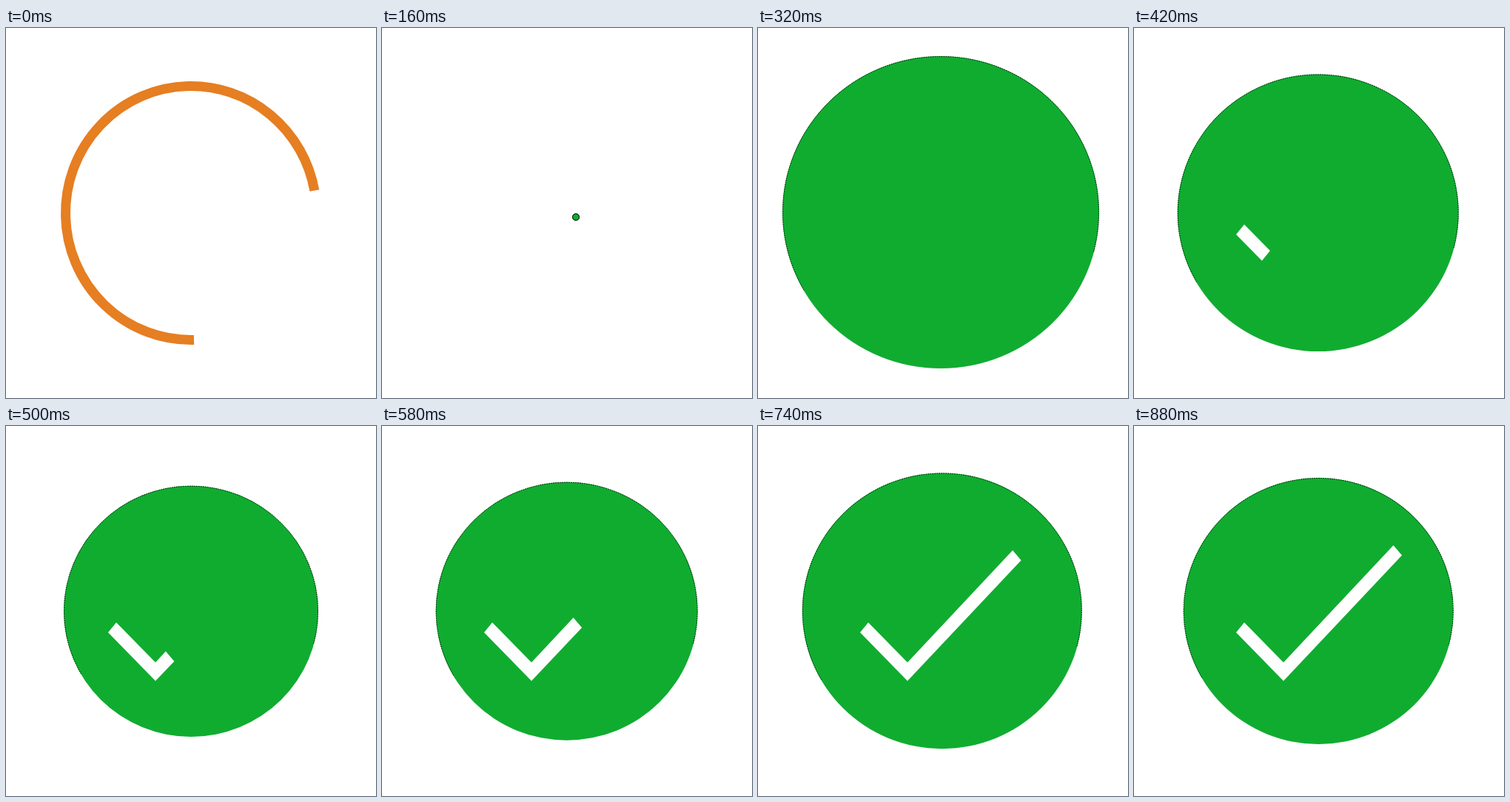
An HTML page with a canvas that plays this animation: 500 px wide and 500 px high, repeating every 1.04 s.

```html
<!DOCTYPE html>
<html lang="en">
<head>
<meta charset="utf-8">
<title>Loader to check mark</title>
<style>
html, body { margin: 0; width: 100%; height: 100%; overflow: hidden; background: #fff; }
canvas { display: block; width: 100vw; height: 100vh; }
</style>
</head>
<body>
<canvas id="stage" width="500" height="500"></canvas>
<script>
const ctx = document.getElementById('stage').getContext('2d');
const LOOP = 1040, STEP = 20, LAST = 880;
const GREEN = '#10ac30', ORANGE = '#e67e22';
const rad = deg => deg * Math.PI / 180;
const mix = (a, b, k) => a + (b - a) * k;
const clamp = k => Math.min(1, Math.max(0, k));

// time, horizontal radius of the disc
const BOUNCE = [[160, 5], [320, 214], [420, 190], [520, 167.5], [580, 177], [690, 191.5], [740, 189], [880, 182.5]];

function track(keys, t) {
  for (let i = 1; i < keys.length; i++) {
    const [t0, a] = keys[i - 1], [t1, b] = keys[i];
    if (t <= t1) return mix(a, b, clamp((t - t0) / (t1 - t0)));
  }
  return keys[keys.length - 1][1];
}

function ring(t) {
  const k = t / 160;
  const tail = mix(88.65, 448, k), head = mix(349.8, 448, k);
  ctx.beginPath();
  ctx.ellipse(250, 250, 169.5, 171.5, 0, rad(tail), rad(head));
  ctx.lineWidth = 13;
  ctx.strokeStyle = ORANGE;
  ctx.stroke();
}

function disc(t) {
  const r = track(BOUNCE, t), k = (r - 5) / 209;
  const x = mix(262, 247, k), y = mix(255.5, 249, k), ry = r * 0.986;
  ctx.beginPath();
  ctx.ellipse(x, y, r, ry, 0, 0, 2 * Math.PI);
  ctx.fillStyle = GREEN;
  ctx.fill();

  // fine dotted rim, missing along the bottom of the large disc
  const full = r < 12;
  ctx.beginPath();
  ctx.ellipse(x, y, r - 0.5, ry - 0.5, 0, rad(full ? 0 : 150), rad(full ? 360 : 375));
  ctx.lineWidth = 1;
  ctx.strokeStyle = '#000';
  ctx.setLineDash(full ? [] : [1.5, 1.5]);
  ctx.stroke();
  ctx.setLineDash([]);
}

function poly(...pts) {
  ctx.beginPath();
  pts.forEach(([x, y]) => ctx.lineTo(x, y));
  ctx.fillStyle = '#fff';
  ctx.fill();
}

function check(t) {
  const A = [143.5, 272.2], B = [202, 332], C = [356.3, 168];
  const inner = [202, 319.5], outer = [202, 344.5];
  const short = 83.7, long = 225.2;
  const drawn = (t - 356) * 0.78;
  if (drawn <= 0) return;

  const edge = (a, b, k, dx, dy) => {
    const x = mix(a[0], b[0], k), y = mix(a[1], b[1], k);
    return [[x + dx, y + dy], [x - dx, y - dy]];
  };
  const [s0, s1] = edge(A, B, 0, 5.5, -6.75);
  if (drawn < short) {
    const [e0, e1] = edge(A, B, drawn / short, 5.5, -6.75);
    poly(s0, e0, e1, s1);
    return;
  }
  const [e0, e1] = edge(B, C, clamp((drawn - short) / long), -5.75, -6.75);
  poly(s0, inner, e0, e1, outer, s1);
}

function draw() {
  const now = performance.now() % LOOP;
  const t = Math.min(LAST, Math.floor(now / STEP) * STEP);
  ctx.fillStyle = '#fff';
  ctx.fillRect(0, 0, 500, 500);
  if (t < 160) {
    ring(t);
  } else {
    disc(t);
    check(t);
  }
  requestAnimationFrame(draw);
}
draw();
</script>
</body>
</html>
```
